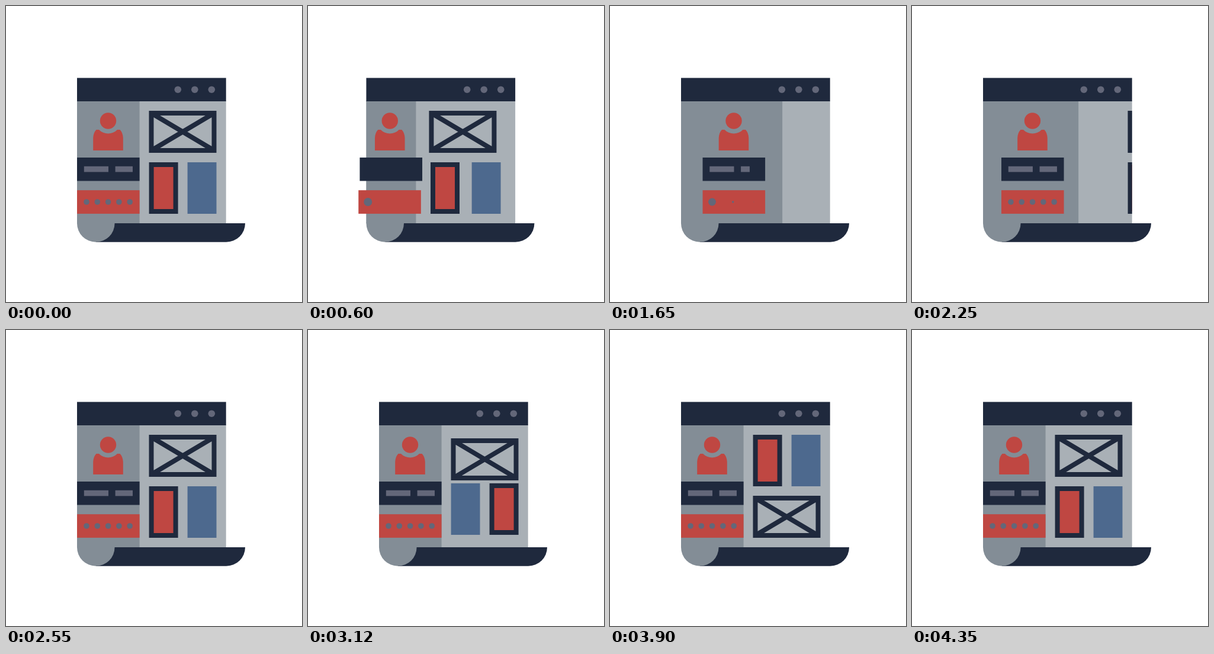
An HTML page for the animation above (4.5 s loop, 500 by 500 pixels).

```html
<!DOCTYPE html>
<html lang="en">
<head>
<meta charset="utf-8">
<title>Page layout</title>
<style>
  html, body { margin: 0; width: 100%; height: 100%; overflow: hidden; background: #fff; }
  svg { display: block; width: 100%; height: 100%; }
  .navy { fill: #1f293d; }
  .slate { fill: #838d96; }
  .panel { fill: #a9b0b6; }
  .red { fill: #bf4742; }
  .blue { fill: #4d698e; }
  .mute { fill: #636779; }
  .frame { stroke: #1f293d; stroke-width: 8; }
</style>
</head>
<body>
<svg viewBox="0 0 500 500">
  <defs>
    <clipPath id="inside"><rect x="0" y="161" width="371.7" height="206"/></clipPath>
  </defs>
  <g id="page">
    <path class="navy" d="M152 367H404A32 31.7 0 0 1 372 398.7H152Z"/>
    <rect class="panel" x="120" y="160" width="251.7" height="207"/>
    <path class="slate" d="M120 366H183.6V367A31.8 31.7 0 0 1 120 367Z"/>
    <rect class="slate" id="side" x="120" y="160" width="105.6" height="207"/>
    <rect class="navy" x="120" y="121.5" width="251.7" height="39.5"/>
    <g class="mute">
      <circle cx="290.3" cy="141.2" r="5.8"/>
      <circle cx="318.8" cy="141.2" r="5.8"/>
      <circle cx="347.3" cy="141.2" r="5.8"/>
    </g>
    <g clip-path="url(#inside)">
      <g id="wire" fill="none">
        <path class="frame" d="M245.5 181H351.5V244H245.5ZL351.5 244M351.5 181L245.5 244"/>
      </g>
      <rect class="blue" id="blueCard" x="306.6" y="264" width="48.9" height="87"/>
      <rect class="red frame" id="redCard" x="245.6" y="268" width="41" height="79"/>
    </g>
    <g class="red" id="avatar">
      <circle cx="172.5" cy="194" r="13.7"/>
      <path d="M147.2 244V223Q147.6 214 152.5 209H157A21.6 21.6 0 0 0 188 209H192.5Q197.4 214 197.8 223V244Z"/>
    </g>
    <g id="login">
      <rect class="navy" x="120" y="256" width="105.6" height="39.5"/>
      <rect class="mute" id="bar1" x="131.8" y="270.8" height="9.6"/>
      <rect class="mute" id="bar2" x="184.6" y="270.8" height="9.6"/>
    </g>
    <g id="secret">
      <rect class="red" x="120" y="311.2" width="105.6" height="39.7"/>
      <g class="mute" id="dots"></g>
    </g>
  </g>
</svg>
<script>
const LOOP = 4500;
const SOFT = 0.65, SHARP = 0.8;
const $ = id => document.getElementById(id);

const dots = Array.from({ length: 5 }, () => {
  const dot = document.createElementNS("http://www.w3.org/2000/svg", "circle");
  dot.setAttribute("cy", 331);
  return $("dots").appendChild(dot);
});

// Symmetric ease, cubic-bezier(a, 0, 1 - a, 1), solved by bisection.
function ease(x, a) {
  if (x <= 0) return 0;
  if (x >= 1) return 1;
  let lo = 0, hi = 1;
  for (let i = 0; i < 24; i++) {
    const s = (lo + hi) / 2, u = 1 - s;
    if (3 * u * u * s * a + 3 * u * s * s * (1 - a) + s * s * s < x) lo = s;
    else hi = s;
  }
  return lo * lo * (3 - 2 * lo);
}

const step = (t, start, length = 450, a = SOFT) => ease((t - start) / length, a);
const move = (id, x, y = 0) => $(id).setAttribute("transform", `translate(${x} ${y})`);

// Leans left with the page, travels right to `far`, then comes home.
function glide(t, lean, far, start) {
  return lean * step(t, 0) + (far - lean) * step(t, start, 600) - far * step(t, 2100);
}

function draw(t) {
  move("page", -31 * step(t, 0) + 62 * step(t, 450) - 31 * step(t, 900));
  $("side").setAttribute("width", 105.6 + glide(t, -26, 65.5, 474));

  move("avatar", glide(t, -16, 36.5, 457));
  move("login", glide(t, -16, 36.5, 432));
  move("secret", glide(t, -16, 36.5, 467));

  const cleared = step(t, 0);
  $("bar1").setAttribute("width", 41.2 * (1 - cleared + step(t, 1150, 450)));
  $("bar2").setAttribute("width", 29.4 * (1 - cleared + step(t, 1350, 600)));

  // Each dot repeats the one before it, spaced and scaled by the same amounts.
  const typed = 1 - cleared + step(t, 1350, 750);
  const size = 7 - 2.2 * typed, gap = 41 - 22.7 * typed;
  dots.forEach((dot, i) => {
    dot.setAttribute("cx", 136 + gap * i);
    dot.setAttribute("r", size * typed ** i);
  });

  const swap = step(t, 2550, 450, SHARP) - step(t, 3450, 450, SHARP);
  const flip = step(t, 3000, 450, SHARP) - step(t, 3900, 450, SHARP);
  move("wire", glide(t, -16, 145, 564), 103 * flip);
  move("redCard", glide(t, -16, 145, 517) + 65 * swap, -87 * flip);
  move("blueCard", glide(t, -16, 145, 474) - 65 * swap, -87 * flip);
}

const begin = performance.now();
function tick() {
  draw((performance.now() - begin) % LOOP);
  requestAnimationFrame(tick);
}
tick();
</script>
</body>
</html>
```
